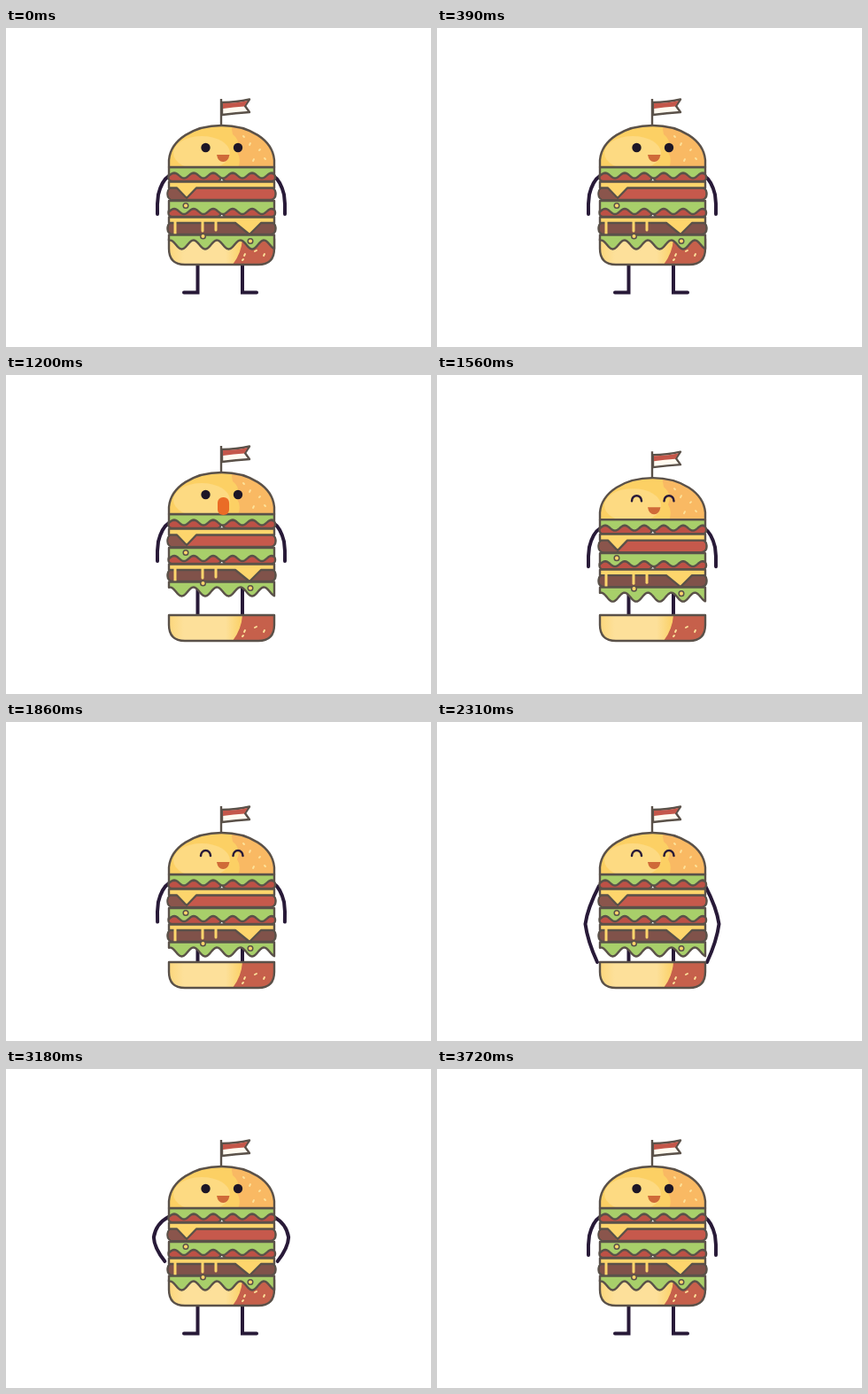
An HTML page for the animation above (3.78 s loop, 480x360 px).

```html
<!DOCTYPE html>
<html lang="en">
<head>
<meta charset="utf-8">
<title>Burger</title>
<style>
html, body { margin: 0; width: 100%; height: 100%; overflow: hidden; background: #fff; }
svg { display: block; width: 480px; height: 360px; }
.ink { stroke: #5a5149; stroke-width: 2.4; stroke-linejoin: round; }
.limb { fill: none; stroke: #281a38; stroke-width: 4; stroke-linecap: round; }
.lettuce { fill: #a8cf6a; }
.tomato { fill: #bd5146; }
.cheese { fill: #fdd56c; }
.seed { stroke: #fde29a; stroke-width: 1.9; stroke-linecap: round; fill: none; }
</style>
</head>
<body>
<svg viewBox="0 0 480 360">
  <defs>
    <linearGradient id="crust">
      <stop offset="0" stop-color="#fcd77c"/>
      <stop offset=".14" stop-color="#fde09a"/>
      <stop offset=".54" stop-color="#fde09a"/>
      <stop offset=".68" stop-color="#fbd26a"/>
    </linearGradient>
    <path id="dome" d="M184 157V149C186 126 212 110 243.500 110S301 126 303 149V157Z"/>
    <path id="heel" d="M184 238H303V249Q303 267 285 267H202Q184 267 184 249Z"/>
    <clipPath id="domeClip"><use href="#dome"/></clipPath>
    <clipPath id="heelClip"><use href="#heel"/></clipPath>
  </defs>

  <path class="limb" d="M216.500 240V298.500H201M267 240V298.500H283"/>
  <path id="arms" class="limb"/>

  <g id="base">
    <g clip-path="url(#heelClip)">
      <path fill="url(#crust)" d="M184 238H303V267H184Z"/>
      <path fill="#c6604b" d="M267 238H303V267H256Q266 254 267 238Z"/>
      <path class="seed" d="M269 257l1-2M281 252l2-1M291 257l1-2M267 262l1-1"/>
    </g>
    <use href="#heel" class="ink" fill="none"/>
  </g>

  <g id="body">
    <path class="ink" fill="#fffaf0" d="M243 110V80M244 84Q260 84 275 80.500L270 88L275 95Q260 96 244 98Z"/>
    <path fill="#c4574a" d="M245 85Q260 85 273 82L269 88.500Q257 89 245 91Z"/>

    <g id="layers"></g>

    <g clip-path="url(#domeClip)">
      <path fill="#fcd064" d="M184 110H303V157H184Z"/>
      <ellipse cx="221" cy="141" rx="32" ry="19" fill="#fdda82"/>
      <path fill="#f9b963" d="M254 108H304V158H262Q266 148 261 140Q266 128 256 120Z"/>
      <path class="seed" d="M268 122l1 1M275 132l1-2M286 138l1-1M292 147l1 1M279 150l1-2"/>
    </g>
    <use href="#dome" class="ink" fill="none"/>

    <g id="dots" fill="#1d1626"><circle cx="225.500" cy="135" r="5.200"/><circle cx="262" cy="135" r="5.200"/></g>
    <path id="arcs" class="limb" style="stroke-width:2.500" d="M220 136a5.500 6 0 0 1 11 0M256.500 136a5.500 6 0 0 1 11 0"/>
    <path id="smile" fill="#cf6a38" d="M238 143H252.500Q251 151 245.200 151T238 143Z"/>
    <rect id="gasp" x="239" y="138" width="13" height="20" rx="6" fill="#ea6c26"/>
  </g>
</svg>
<script>
const $ = id => document.getElementById(id);
const LOOP = 3780;

// Static filling
const bar = (cls, x, y, w, h, r, fill = '') =>
  `<rect class="ink ${cls}" x="${x}" y="${y}" width="${w}" height="${h}" rx="${r}" ${fill && `fill="${fill}"`}/>`;
const shape = (cls, d) => `<path class="ink ${cls}" d="${d}"/>`;
const drop = (x, y) => `<circle class="ink cheese" cx="${x}" cy="${y}" r="2.8" style="stroke-width:1.5"/>`;
const drip = (x, y) => `<path d="M${x} 218V${y}" stroke="#fdd56c" stroke-width="3" stroke-linecap="round"/>`;
const tomatoes = y => bar('tomato', 183.5, y, 59, 9, 4) + bar('tomato', 245, y, 59, 9, 4);

// Leaf with a wavy lower edge; one wave hangs lowest at x = low
function lettuce(top, y, depth, period, low) {
  let d = `M184 ${top}H303`;
  for (let x = 303; x >= 184; x--) {
    d += `L${x} ${(y + depth * Math.cos((x - low) / period * 2 * Math.PI)).toFixed(2)}`;
  }
  return shape('lettuce', d + 'Z');
}

$('layers').innerHTML =
  tomatoes(164) + lettuce(157, 166.5, 3, 22, 245) +
  bar('', 182.5, 180, 122, 14, 6, '#c6594c') +
  '<path d="M189 181H208L202 193H189Q183.500 193 183.500 187T189 181Z" fill="#8a554c"/>' +
  shape('cheese', 'M184 173.500H303V180.500H215L204 192L193 180.500H184Z') +
  tomatoes(204) + lettuce(195, 207, 3, 22, 245) + drop(203, 200.5) +
  bar('', 182.5, 219, 122, 14, 6, '#80524a') +
  shape('cheese', 'M184 213.500H303V220H288L275 233L259 220H184Z') +
  drip(191, 233) + drip(222, 229) + drip(237, 228) +
  lettuce(233.5, 244.5, 5, 26.5, 225) + drop(222.5, 235) + drop(276, 240.5);

// Left arm: shoulder, bend, elbow, bend, hand
const REST = [184, 167, 176, 172, 172, 188, 170.5, 198, 171, 210];
const REACH = [183, 170, 170, 195, 167.5, 213, 170, 232, 181, 256];
const HOLD = [183, 167, 165.5, 176, 164, 191, 165.5, 204, 184, 221];

const clamp = u => Math.min(1, Math.max(0, u));
const ease = (t, from, to) => {
  const u = clamp((t - from) / (to - from));
  return u * u * (3 - 2 * u);
};
const mix = (a, b, u) => a.map((v, i) => v + (b[i] - v) * u);
const armPath = ([a, b, c, d, e, f, g, h, i, j]) => `M${a} ${b}Q${c} ${d} ${e} ${f}Q${g} ${h} ${i} ${j}`;
const show = (id, on) => $(id).setAttribute('visibility', on ? 'visible' : 'hidden');
const shift = (id, y) => $(id).setAttribute('transform', `translate(0 ${y})`);

function draw(t) {
  const fall = clamp((t - 420) / 200) ** 2;
  const lift = ease(t, 2430, 2750);
  const crouch = 15 * (ease(t, 1420, 1740) - lift);
  shift('base', 33 * (fall - lift));
  shift('body', crouch);

  let arm = mix(REST, REACH, ease(t, 1840, 2170));
  arm = mix(arm, HOLD, lift);
  arm = mix(arm, REST, ease(t, 3100, 3300));
  const mirrored = arm.map((v, i) => i % 2 ? v : 486 - v);
  $('arms').setAttribute('d', armPath(arm) + armPath(mirrored));
  shift('arms', crouch);

  const happy = t >= 1300 && t < 2900;
  const shocked = t >= 450 && t < 1300;
  show('dots', !happy);
  show('arcs', happy);
  show('smile', !shocked);
  show('gasp', shocked);
}

function frame() {
  draw(performance.now() % LOOP);
  requestAnimationFrame(frame);
}
frame();
</script>
</body>
</html>
```
